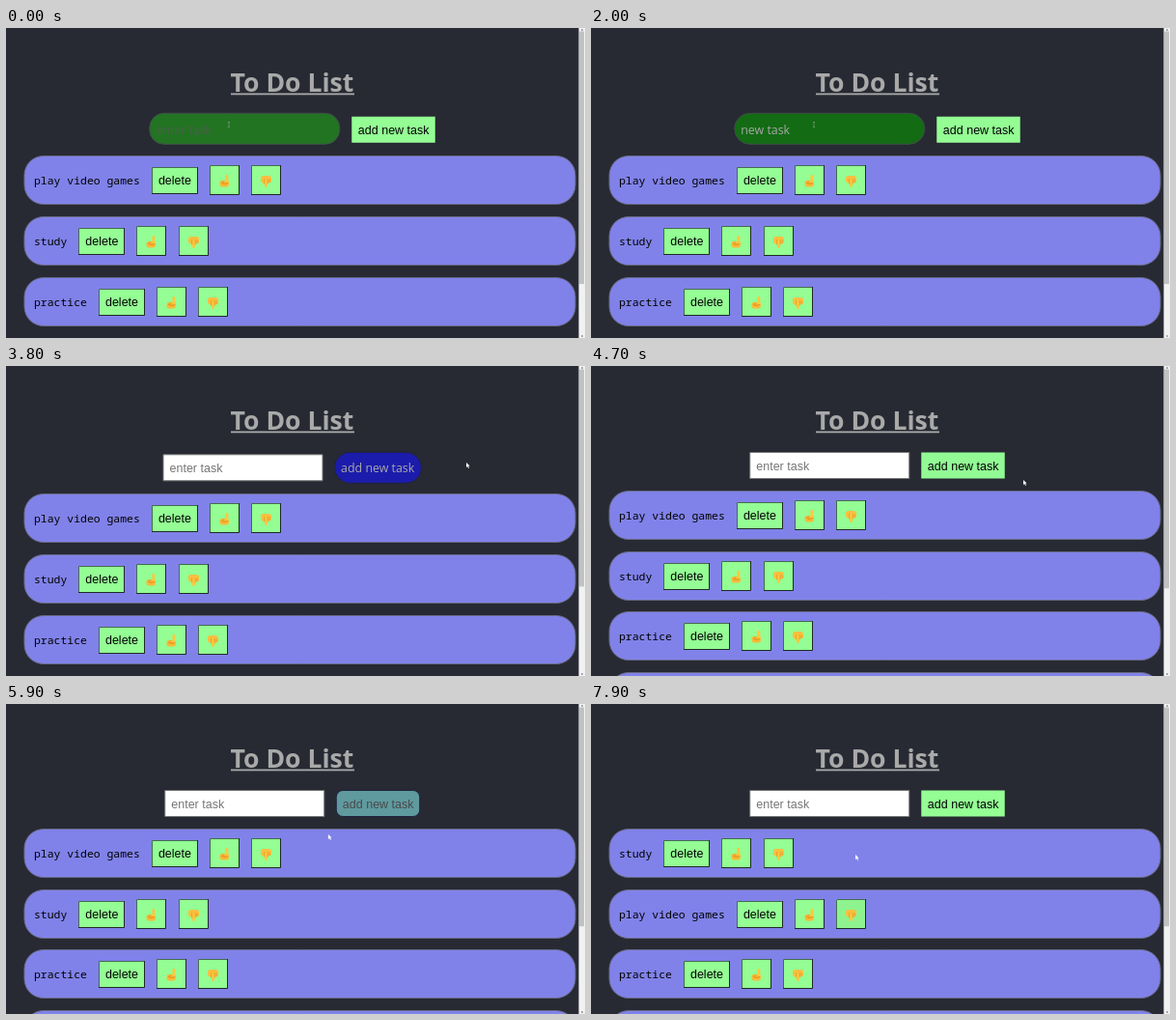
An HTML page with a canvas that plays this animation: 600x321 px, repeating every 8000 ms.

```html
<!DOCTYPE html>
<html lang="en">
<head>
<meta charset="utf-8">
<title>To Do List</title>
<style>
html, body { margin: 0; width: 600px; height: 321px; overflow: hidden; background: #272a33; }
canvas { display: block; }
</style>
</head>
<body>
<canvas id="stage" width="600" height="321"></canvas>
<script>
const c = document.getElementById('stage').getContext('2d');
const LOOP = 8000, FADE = 1000;
const PLAIN = '12.5px "Liberation Sans", Arial, sans-serif';
const HAND = '500 12.4px "Comic Sans MS", "Open Sans", sans-serif';
const MONO = '11.45px "Noto Sans Mono", monospace';
const TITLE = 'bold 26.6px "Comic Sans MS", "Open Sans", sans-serif';
const GREEN = [148, 253, 148], BLUE = [28, 28, 172], DARK = [19, 107, 20];
const WHITE = [255, 255, 255], GRAY = [169, 169, 169], BLACK = [0, 0, 0];
const PRESSED = [82, 146, 82], HINT = [117, 117, 117], FAINT = [72, 94, 72];

// Interaction times
const LEAVE_INPUT = 2700, ADD = 3300, SWAP = 7250, DOWN_FROM = 6250;
const ADD_HOVERS = [[LEAVE_INPUT, 3850], [4800, 5600]];

// Pointer path: time, x, y
const PATH = [
  [0, 231, 100], [2450, 231, 100], [2750, 400, 108], [3650, 405, 108],
  [3800, 478, 102], [4400, 478, 106], [4700, 449, 120], [4950, 405, 111],
  [5500, 405, 111], [6250, 278, 158], [7250, 278, 158], [7900, 275, 158], [8000, 275, 158]
];

const clamp = v => Math.max(0, Math.min(1, v));
const ease = v => 1 - (1 - clamp(v)) ** 2.3;
const mix = (a, b, k) => `rgb(${a.map((v, i) => Math.round(v + (b[i] - v) * k))})`;
const within = (t, [from, to]) => t >= from && t < to;
const hover = (t, [from, to]) => t < to ? ease((t - from) / FADE) : 1 - ease((t - to) / FADE);

function text(s, x, y, font, color) {
  c.font = font;
  c.fillStyle = color;
  c.fillText(s, x, y);
}

function box(x, y, w, h, r, fill, stroke) {
  c.beginPath();
  c.roundRect(x, y, w, h, r);
  c.fillStyle = fill;
  c.fill();
  if (stroke) {
    c.strokeStyle = stroke;
    c.lineWidth = 1;
    c.stroke();
  }
}

function line(points, color, width) {
  c.beginPath();
  points.forEach(([x, y]) => c.lineTo(x, y));
  c.strokeStyle = color;
  c.lineWidth = width;
  c.stroke();
}

function hand(x, y, up) {
  c.save();
  c.translate(x, y);
  if (up) {
    box(-5.5, -.5, 9.5, 6.5, 2.4, '#f9b936');
    box(.5, -6.5, 2.8, 9, 1.4, '#ffc83d');
    line([[-4, 1.5], [-1, 3], [3, 2]], '#d88a25', .9);
    line([[-2, -.5], [-1.5, 2]], '#dc9227', .7);
  } else {
    box(-6, -5.5, 11, 7.5, 2.8, '#fbbf3e');
    box(-2, -2, 3, 8.5, 1.4, '#ffc83d');
    line([[-2.3, -2.5], [-2.3, 3]], '#dc9227', .7);
    line([[1.2, -2.5], [1.2, 3]], '#dc9227', .7);
    line([[3.2, -2], [3.2, 1.5]], '#dc9227', .7);
  }
  c.restore();
}

function rowButton(x, y, w, h, k = 0) {
  box(x + .5, y + .5, w - 1, h - 1, 14 * k, mix(GREEN, PRESSED, k), '#456b50');
  if (k < .1) line([[x + w - .5, y], [x + w - .5, y + h - .5], [x, y + h - .5]], '#1f2a25', 1);
}

function row(label, y, h, downHover) {
  box(19, y + .5, 571, h - .5, 20, '#8082e9', '#6a6a86');
  text(label, 29, y + 29.7, MONO, '#000');
  const x = 29 + label.length * 6.87 + 12.4;
  rowButton(Math.floor(x), y + 12, 48, 28);
  text('delete', x + 6.6, y + 30, PLAIN, '#000');
  const up = Math.floor(x + 60.2), down = Math.floor(x + 103.6);
  rowButton(up, y + 10, 31, 31);
  hand(up + 16, y + 26.5, true);
  rowButton(down, y + 10, 31, 31, downHover);
  hand(down + 16, y + 26.5, false);
}

function form(t, onInput, onAdd) {
  const hi = hover(t, [-700, LEAVE_INPUT]);
  const hb = hover(t, ADD_HOVERS[t < 4800 ? 0 : 1]);
  const iw = onInput ? 198 : 166, ih = onInput ? 33 : 28;
  const bw = onAdd ? 90 : 86.5, bh = onAdd ? 32 : 27;
  const gap = 12;
  const cy = onInput || onAdd ? 105.3 : 103;
  const ix = 296.5 - (iw + gap + bw) / 2, bx = ix + iw + gap;
  const iy = cy - ih / 2 - (onInput ? 1 : 0);

  box(ix + .5, iy + .5, iw - 1, ih - 1, 16 * hi, mix(WHITE, DARK, hi),
    mix([118, 118, 118], [62, 78, 70], hi));
  const typed = t < ADD ? 'new task'.slice(0, Math.max(0, Math.floor((t - 580) / 120))) : '';
  text(typed || 'enter task', ix + 7, cy + 4.5, onInput ? HAND : PLAIN,
    typed ? mix(BLACK, GRAY, hi) : mix(HINT, FAINT, hi));

  box(bx, cy - bh / 2, bw, bh, 16 * hb, mix(GREEN, BLUE, hb), hb > .1 ? '#20223f' : null);
  text('add new task', bx + 6.6, cy + 4.5, onAdd ? HAND : PLAIN, mix(BLACK, GRAY, hb));
}

function scrollbar(height, scroll) {
  c.fillStyle = '#f1f1f1';
  c.fillRect(593.5, 0, 6.5, 321);
  c.fillStyle = '#c1c1c1';
  c.fillRect(594, 3.5 + scroll / height * 315, 5, 315 * 321 / height);
  c.fillStyle = '#666';
  c.fillRect(596, 1.5, 2, 1);
  c.fillRect(596, 318.5, 2, 1);
}

function pointer(t, kind) {
  const i = Math.max(1, PATH.findIndex(p => p[0] > t));
  const [a, b] = [PATH[i - 1], PATH[i]];
  const k = clamp((t - a[0]) / (b[0] - a[0])), s = k * k * (3 - 2 * k);
  c.save();
  c.translate(a[1] + (b[1] - a[1]) * s, a[2] + (b[2] - a[2]) * s);
  if (kind === 'beam') {
    line([[-1, -2.5], [1, -2.5]], '#7f9a7f', .8);
    line([[0, -2.5], [0, 2.5]], '#7f9a7f', .7);
    line([[-1, 2.5], [1, 2.5]], '#7f9a7f', .8);
  } else if (kind === 'hand') {
    box(-1, -3.5, 1.6, 5, .7, '#fff', '#333');
    box(-1.5, -.5, 4, 4.5, 1.2, '#fff');
  } else {
    c.beginPath();
    [[0, -1], [0, 4], [1.2, 3], [2.2, 5], [3, 4.5], [2.1, 2.7], [3.6, 2.6]]
      .forEach(([x, y]) => c.lineTo(x - 1, y - 1));
    c.fillStyle = '#fff';
    c.fill();
  }
  c.restore();
}

function draw(t) {
  const onInput = t < LEAVE_INPUT;
  const onAdd = ADD_HOVERS.some(span => within(t, span));
  const onDown = within(t, [DOWN_FROM, SWAP]);
  const shift = onInput || onAdd ? 3.6 : 0;
  const grow = onDown ? 1 : 0;
  const scroll = within(t, [4000, 4400]) ? 125 : 0;

  const tasks = ['play video games', 'study', 'practice'];
  if (t >= SWAP) tasks.unshift(tasks.splice(1, 1)[0]);
  if (t >= ADD) tasks.push('new task');

  c.fillStyle = '#272a33';
  c.fillRect(0, 0, 600, 321);
  c.save();
  c.translate(0, -scroll);
  text('To Do List', 232.5, 66, TITLE, '#a9a9a9');
  c.fillRect(233, 67.5, 128, 1.8);
  form(t, onInput, onAdd);
  tasks.forEach((label, i) => {
    const y = Math.round(128.7 + shift + i * 62.8) + (i ? grow : 0);
    const k = label === 'play video games' ? hover(t, [DOWN_FROM, SWAP]) : 0;
    row(label, y, 50.5 + (i ? 0 : grow), k);
  });
  c.restore();
  scrollbar(194 + 63 * tasks.length + shift, scroll);
  const onButton = onDown || onAdd && !within(t, [3700, 4800]);
  pointer(t, t < 2600 ? 'beam' : onButton ? 'hand' : 'arrow');
}

const start = performance.now();
function tick() {
  draw((performance.now() - start) % LOOP);
  requestAnimationFrame(tick);
}
tick();
</script>
</body>
</html>
```
